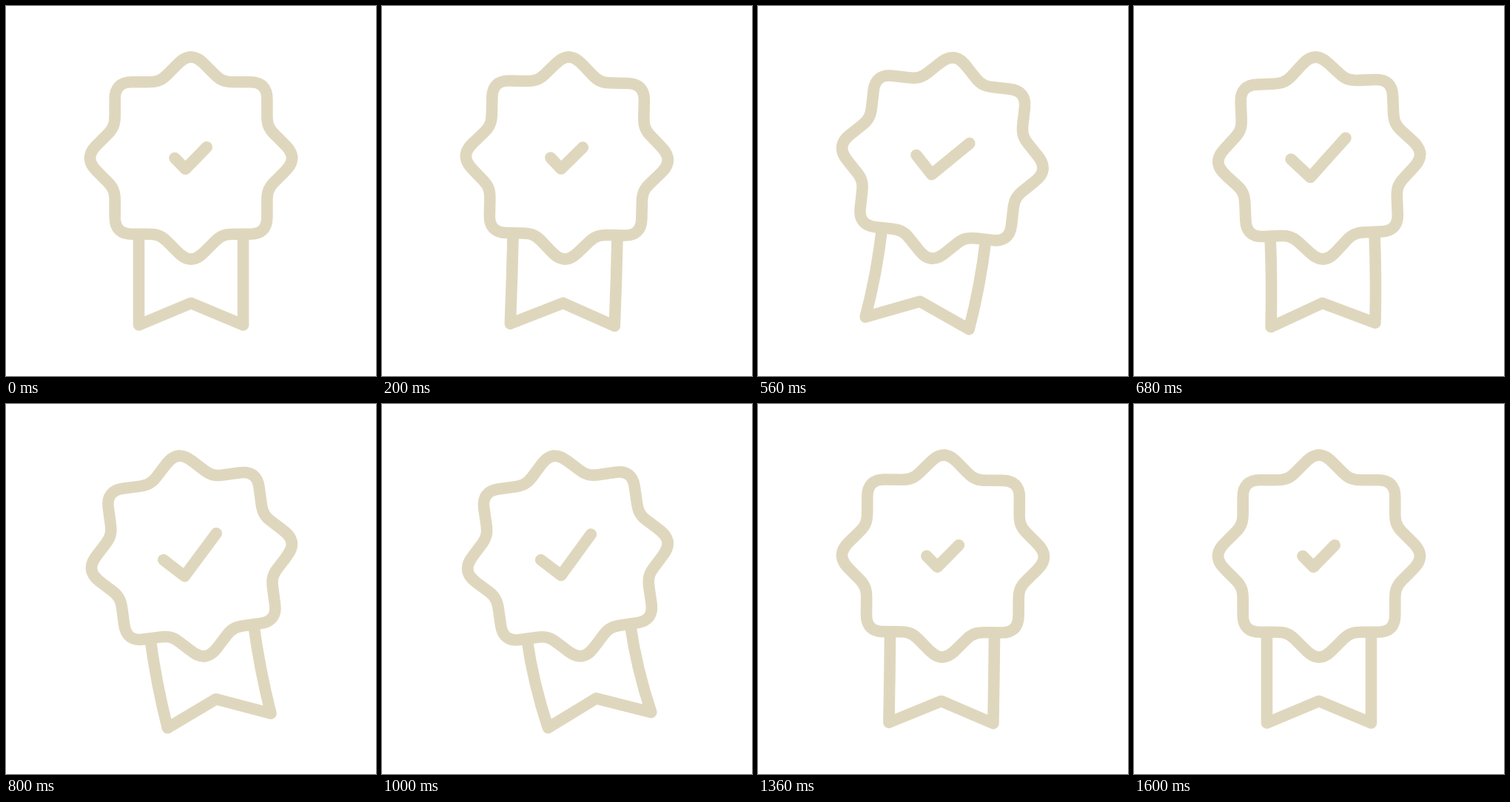
An HTML page for the animation above (1.72 s loop, 500 by 500 pixels).

```html
<!DOCTYPE html>
<html lang="en">
<head>
<meta charset="utf-8">
<title>Award badge</title>
<style>
  html, body { margin: 0; width: 100%; height: 100%; overflow: hidden; background: #fff; }
  svg { display: block; width: 100vw; height: 100vh; }
  #badge { fill: none; stroke: #dfd7bd; stroke-width: 15.6; stroke-linecap: round; stroke-linejoin: round; }
</style>
</head>
<body>
<svg viewBox="0 0 500 500">
  <defs>
    <path id="quarter" d="M0-136.5C9-136.5 15-130 20-125L33-112C41-104 48-102.8 58-102.8H80C95-102.8 102.8-95 102.8-80V-58C102.8-48 104-41 112-33L125-20C130-15 136.5-9 136.5 0"/>
  </defs>
  <g id="badge">
    <use href="#quarter"/>
    <use href="#quarter" transform="rotate(90)"/>
    <use href="#quarter" transform="rotate(180)"/>
    <use href="#quarter" transform="rotate(270)"/>
    <path id="ribbon"/>
    <path id="check"/>
  </g>
</svg>
<script>
  const LOOP = 1720, STEP = 40;
  const $ = id => document.getElementById(id);
  const badge = $('badge'), ribbon = $('ribbon'), check = $('check');

  // [time in ms, value]
  const angle = [[102, 0], [395, 8.6], [915, -8.6], [1315, 0.5], [1600, 0]];
  const sway = [[90, 0], [445, -9.7], [1015, 11.2], [1265, -0.7], [1600, 0]];
  const size = [[230, 1], [750, 1.75], [825, 1.75], [1400, 1]];

  // cubic-bezier(2/3, 0, 1/3, 1), solved by bisection
  function ease(x) {
    let lo = 0, hi = 1;
    for (let i = 0; i < 24; i++) {
      const s = (lo + hi) / 2;
      if (2 * s - 3 * s * s + 2 * s * s * s < x) lo = s; else hi = s;
    }
    return lo * lo * (3 - 2 * lo);
  }

  function valueAt(keys, t) {
    if (t <= keys[0][0]) return keys[0][1];
    for (let i = 1; i < keys.length; i++) {
      const [t0, a] = keys[i - 1], [t1, b] = keys[i];
      if (t < t1) return a + (b - a) * ease((t - t0) / (t1 - t0));
    }
    return keys[keys.length - 1][1];
  }

  function draw(t) {
    const bend = valueAt(sway, t), tilt = bend * 0.04, k = valueAt(size, t);
    badge.setAttribute('transform', `rotate(${valueAt(angle, t)} 250 199) translate(250 205.5)`);
    ribbon.setAttribute('d',
      `M-70.5 103Q-70.5 164 ${bend - 70.5} ${225.5 + tilt}` +
      `L${bend * 0.95} 196L${bend + 70.5} ${225.5 - tilt}Q70.5 164 70.5 103`);
    check.setAttribute('d', `M${-22 * k} 0L${-7.5 * k} ${14.7 * k}L${21.2 * k} ${-14.8 * k}`);
  }

  const start = performance.now();
  function tick() {
    const t = (performance.now() - start) % LOOP;
    draw(Math.floor(t / STEP) * STEP);
    requestAnimationFrame(tick);
  }
  tick();
</script>
</body>
</html>
```
